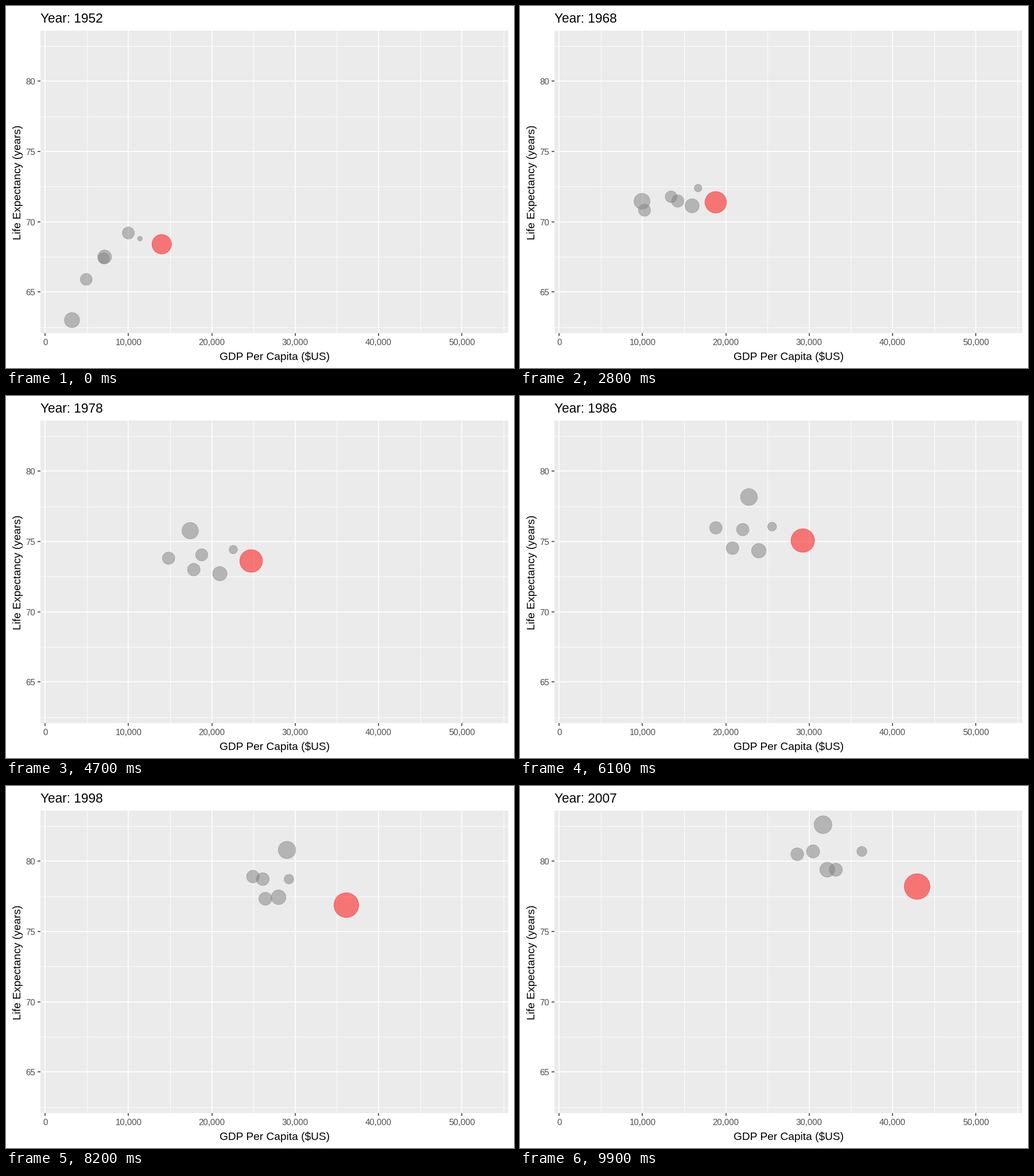
Write a matplotlib script that moves like this. It is 885x632 px and loops after 10 s.

```python
import numpy as np
import matplotlib.pyplot as plt
from matplotlib.animation import FuncAnimation
from matplotlib.patches import Circle, Rectangle

W, H, DPI = 885, 632, 64
FRAMES, INTERVAL = 100, 100
PT = 72 / DPI  # points per pixel
LEFT, TOP, RIGHT, BOTTOM = 60, 43, 875, 571
GRAY, RED = "#7F7F7F", "#FF0000"

plt.rcParams["font.family"] = ["Liberation Sans", "DejaVu Sans"]
plt.rcParams["text.hinting"] = "native"

# The data moves in straight legs between five-year surveys; each bubble
# follows a smooth curve through a few key surveys.
STEPS = np.arange(12)
KEYS = [0, 2, 5, 9, 11]

# color, population range (millions), GDP (thousands) and life at KEYS
BUBBLES = [
    (GRAY, (15, 33), (11.37, 13.46, 22.09, 28.95, 36.32), (68.8, 71.3, 74.2, 78.6, 80.7)),
    (GRAY, (42, 61), (7.03, 10.56, 18.29, 25.89, 30.47), (67.4, 70.5, 73.8, 78.6, 80.7)),
    (GRAY, (69, 82), (7.14, 12.90, 20.51, 27.79, 32.17), (67.5, 70.3, 72.5, 77.3, 79.4)),
    (GRAY, (48, 58), (4.93, 8.24, 14.26, 24.68, 28.57), (65.9, 69.2, 73.5, 78.8, 80.5)),
    (GRAY, (86, 127), (3.22, 6.58, 16.61, 28.82, 31.66), (63.0, 68.7, 75.4, 80.7, 82.6)),
    (GRAY, (50, 61), (9.98, 12.48, 17.43, 26.07, 33.20), (69.2, 70.8, 72.8, 77.2, 79.4)),
    (RED, (158, 301), (13.99, 16.17, 24.07, 35.77, 42.95), (68.4, 70.2, 73.4, 76.8, 78.2)),
]
POP_MIN, POP_MAX = 15, 301


def px(gdp):
    return 68.2 + gdp * 14.52


def py(life):
    return 131.4 + (80 - life) * 24.53


def radius(pop):
    return 4.2 + 18.2 * np.sqrt((pop - POP_MIN) / (POP_MAX - POP_MIN))


def survey(keys):
    return np.polyval(np.polyfit(KEYS, keys, len(KEYS) - 1), STEPS)


fig = plt.figure(figsize=(W / DPI, H / DPI), dpi=DPI, facecolor="white")
ax = fig.add_axes([0, 0, 1, 1])
ax.set(xlim=(0, W), ylim=(H, 0))
ax.axis("off")


def line(xs, ys, color, width, z):
    ax.plot(xs, ys, color=color, lw=width * PT, solid_capstyle="butt", zorder=z)


def grid(xs, ys, major):
    line(xs, ys, "white", 1.6 if major else 0.9, 2 if major else 1)


def label(x, y, text, size, color="black", ha="center", rotation=0):
    return ax.text(x, y, text, fontsize=size * PT, color=color, ha=ha,
                   va="baseline", rotation=rotation, rotation_mode="anchor",
                   parse_math=False, zorder=5)


ax.add_patch(Rectangle((LEFT, TOP), RIGHT - LEFT, BOTTOM - TOP,
                       fc="#EBEBEB", ec="none", zorder=0))

for g in range(0, 60, 5):
    x, major = px(g), g % 10 == 0
    grid([x, x], [TOP, BOTTOM], major)
    if major:
        line([x, x], [BOTTOM, BOTTOM + 5], "#333333", 1.5, 2)
        label(x, 592.5, f"{g * 1000:,}", 15, "#4D4D4D")

for v in np.arange(62.5, 83, 2.5):
    y, major = py(v), v % 5 == 0
    grid([LEFT, RIGHT], [y, y], major)
    if major:
        line([LEFT - 5, LEFT], [y, y], "#333333", 1.5, 2)
        label(51, y + 6, f"{v:.0f}", 15, "#4D4D4D", ha="right")

label(467.5, 618, "GDP Per Capita ($US)", 19.1)
label(26, 307.5, "Life Expectancy (years)", 19.1, rotation=90)
title = label(LEFT, 29, "", 22.6, ha="left")

bubbles = []
for color, pops, gdp, life in BUBBLES:
    dot = Circle((0, 0), 1, fc=color, ec=color, lw=0.8 * PT, alpha=0.5, zorder=4)
    bubbles.append((ax.add_patch(dot), pops, survey(gdp), survey(life)))


def update(i):
    t = i / (FRAMES - 1) * STEPS[-1]
    title.set_text(f"Year: {1952 + 5 * t:.0f}")
    for dot, pops, gdp, life in bubbles:
        dot.center = px(np.interp(t, STEPS, gdp)), py(np.interp(t, STEPS, life))
        dot.radius = radius(np.interp(t, [0, STEPS[-1]], pops))
    return [title, *(b[0] for b in bubbles)]


anim = FuncAnimation(fig, update, frames=FRAMES, interval=INTERVAL,
                     repeat=True, repeat_delay=0, blit=False)
plt.show()
```
